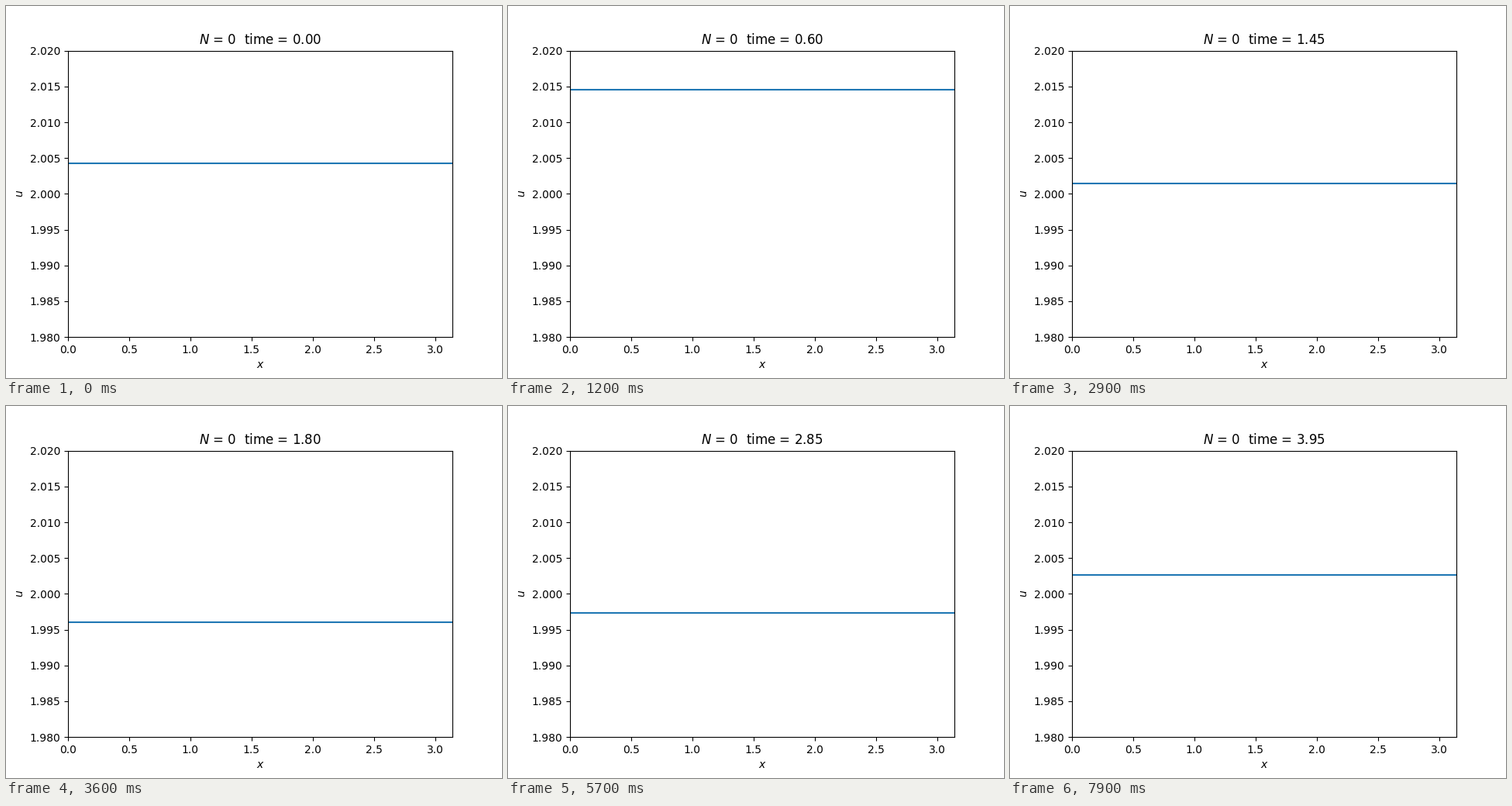
Recreate the animation shown at these times as a matplotlib script. Size 640x480 px, loop 8000 ms.

```python
import numpy as np
import matplotlib.pyplot as plt
from matplotlib.animation import FuncAnimation

FRAMES = 80
INTERVAL = 100   # ms per frame
DT = 0.05        # model time per frame

MEAN, AMP = 2.0, 0.0202
DECAY, OMEGA, LEAD = 0.515, 1.912, 0.111


def level(t):
    """Uniform state relaxing to its mean as a damped oscillation."""
    return MEAN + AMP * np.exp(-DECAY * t) * np.sin(OMEGA * (t + LEAD))


fig, ax = plt.subplots(figsize=(6.4, 4.8), dpi=100)
x = np.linspace(0, np.pi, 101)
line, = ax.plot(x, np.full_like(x, level(0)))
ax.set_xlim(0, np.pi)
ax.set_ylim(1.98, 2.02)
ax.set_xlabel("$x$")
ax.set_ylabel("$u$")
title = ax.set_title("")


def update(i):
    t = i * DT
    line.set_ydata(np.full_like(x, level(t)))
    title.set_text(f"$N$ = 0  time = {t:.2f}")
    return line, title


anim = FuncAnimation(fig, update, frames=FRAMES, interval=INTERVAL,
                     init_func=lambda: update(0), repeat=True,
                     repeat_delay=0, blit=False)
plt.show()
```
